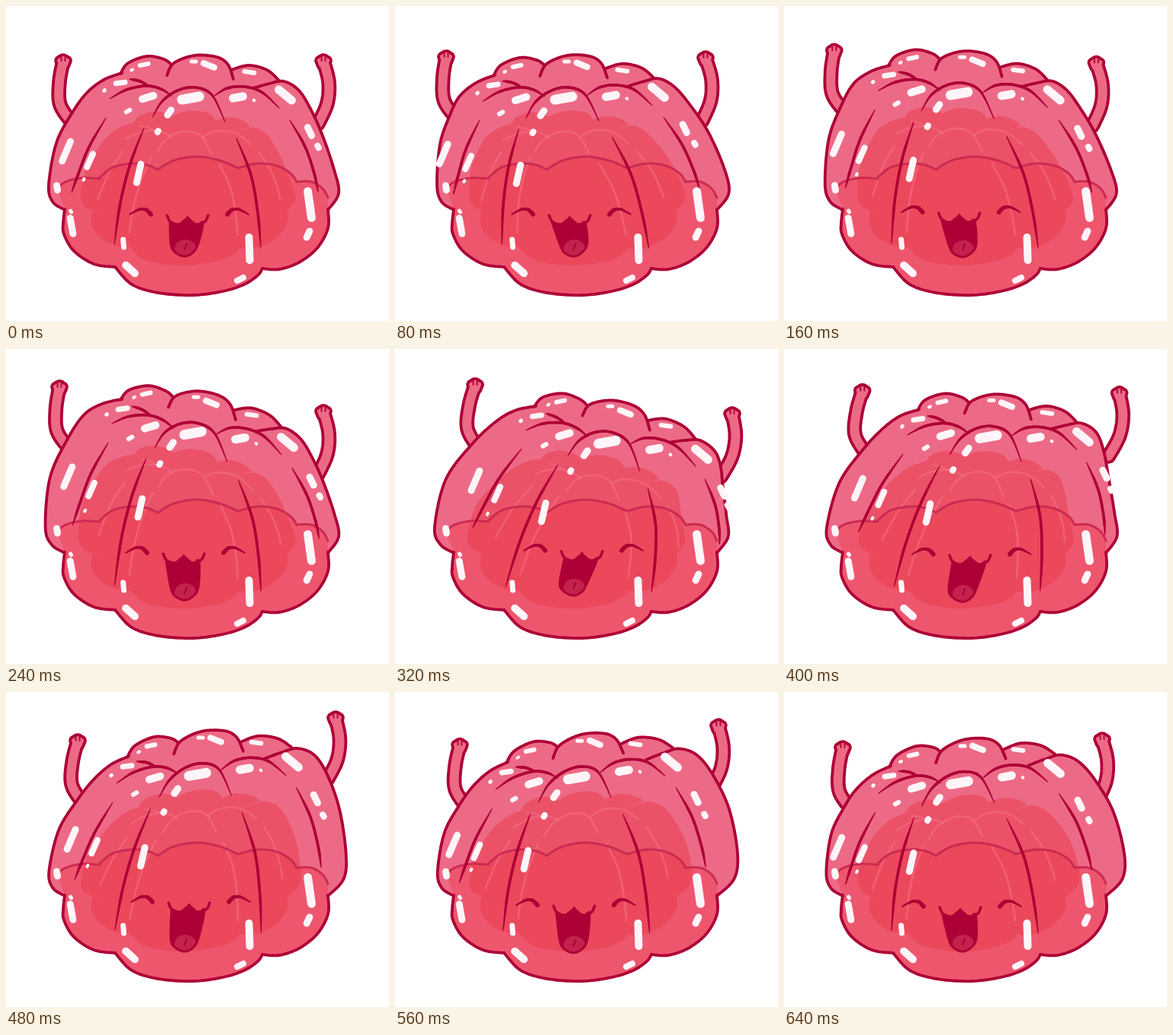
An HTML page with a canvas that plays this animation: 502x414 px, repeating every 720 ms.

```html
<!DOCTYPE html>
<html lang="en">
<head>
<meta charset="utf-8">
<title>Dancing jelly</title>
<style>
html, body { margin: 0; width: 100%; height: 100%; overflow: hidden; background: #fff; }
canvas { display: block; }
</style>
</head>
<body>
<canvas id="stage" width="502" height="414"></canvas>
<script>
const ctx = document.getElementById('stage').getContext('2d');
const LINE = '#ad0036', JELLY = '#ed6a86', SKIRT = '#ee566e', SHINE = '#fff5f8';
const MID = 245, STEP_MS = 80;

// Positions among the key poses, one per step; halves lie between two poses.
const STEPS = [0, 1, 1.5, 2, 3, 3.5, 4, 4.5, 5];

// Dome dx, dy, tilt; face dx, dy; chin drop; left hand dx, dy; right hand dx, dy.
const POSES = [
  [0, 0, 0, 0, 0, 0, 0, 0, 0, 0],
  [-21, 0, -.03, -9, 0, 0, -8, -5, -9, -4],
  [3, -10, .13, -5, -6, 1, -5, -22, 0, 10],
  [36, 2, .16, 7, -9, -5, 30, -25, 26, 13],
  [9, -13, -.1, 2, 2, 12, 19, -8, 16, -38],
  [-12, -2, -.12, -7, 8, 12, 2, 1, 1, -10]];

// The jelly at rest, as points on smooth curves.
const outline = [
  [75,267, 61,257, 56,235, 66,180, 87,140, 106,114, 128,97, 152,88],
  [150,89, 160,75, 185,66, 207,70, 217,77],
  [211,91, 220,75, 247,65, 276,67, 291,77, 298,96],
  [295,84, 318,78, 342,84, 357,97],
  [324,108, 345,102, 364,99, 383,110, 398,133, 414,168, 430,215, 436,246, 422,268]];
const ridges = [
  [162,96, 176,99, 188,106],
  [136,122, 158,110, 184,105, 203,109, 217,118],
  [192,146, 205,125, 225,111, 248,107, 270,117, 287,152],
  [273,118, 290,108, 312,106, 335,113, 358,134],
  [131,147, 109,185, 95,220, 86,245],
  [181,160, 163,207, 150,258, 142,313],
  [302,174, 321,222, 330,272, 334,318],
  [372,150, 392,185, 404,220, 409,244]];
const rim = [
  [67,240, 78,231, 100,226, 123,227],
  [123,225, 140,212, 165,207, 185,209, 199,215],
  [199,215, 220,203, 250,198, 280,203, 304,213],
  [304,213, 330,207, 355,210, 373,220, 381,231],
  [381,231, 400,231, 415,240, 422,252]];
const hem = [
  [422,267, 422,292, 408,318, 384,337, 358,346, 336,345],
  [336,345, 330,354, 312,366, 284,375, 245,380, 200,377, 165,366, 143,343],
  [143,343, 115,339, 89,322, 76,300, 75,285, 77,267]];
const arms = [
  [88,155, 71,130, 70,100, 75,72],
  [409,155, 421,128, 423,100, 416,72]];

// Shines: x, y, length, width, degrees.
const domeShines = [
  [181,77,17,6,-12], [165,84,6,4,-30], [266,78,23,8,22], [246,73,11,5,0], [319,87,19,6,8],
  [150,101,19,7,-8], [129,111,6,5,-40], [186,120,25,10,-17], [160,138,11,6,-30],
  [242,121,36,13,-10], [214,140,17,9,125], [199,165,10,8,120], [304,120,24,11,-10],
  [325,124,5,4,40], [366,117,33,11,40], [398,165,21,9,64], [409,185,11,8,60],
  [79,191,37,9,-67], [110,203,27,8,-66], [102,228,6,4,-60], [174,220,34,9,-77]];
const skirtShines = [
  [319,319,40,10,88], [154,312,17,7,85], [163,346,26,10,42], [398,261,46,11,82],
  [396,300,18,9,115], [67,239,15,9,80], [86,289,30,9,80], [85,270,7,5,60], [307,359,17,8,-27]];

const clamp = v => Math.max(0, Math.min(1, v));

function poseAt(pos) {
  const i = Math.floor(pos), n = POSES.length;
  if (i === pos) return POSES[i];
  const [a, b, c, d] = [i - 1, i, i + 1, i + 2].map(k => POSES[(k + n) % n]);
  return b.map((v, k) => (9 * (v + c[k]) - a[k] - d[k]) / 16);
}

// Apply f to each point of a flat list.
function mapPoints(p, f) {
  const out = [];
  for (let i = 0; i < p.length; i += 2) out.push(...f(p[i], p[i + 1], i / (p.length - 2)));
  return out;
}
const shift = (p, dx, dy) => mapPoints(p, (x, y) => [x + dx, y + dy]);

// The front sways most at the top; it is fixed at the bottom.
function bendFront(p, [dx, dy, tilt]) {
  return mapPoints(p, (x, y) => {
    const k = clamp((330 - y) / 190);
    return [x + k * dx, y + k * (dy + tilt * (x - MID))];
  });
}

// The outline is stiffer low down, and the side that rises swells outwards.
function bendEdge(p, [dx, dy, tilt]) {
  return mapPoints(p, (x, y) => {
    const k = clamp((267 - y) / 150) ** 2;
    const swell = Math.max(0, tilt * (MID - x) / 190) * (x < MID ? -80 : 220);
    return [x + k * dx + swell * Math.sin(Math.PI * clamp((267 - y) / 220)),
            y + k * (dy + tilt * (x - MID))];
  });
}

// Smooth curve through flat points, as a list of [x, y].
function curve(p) {
  const n = p.length / 2, out = [];
  const get = (i, c) => p[2 * Math.max(0, Math.min(n - 1, i)) + c];
  for (let i = 0; i < n - 1; i++) {
    for (let t = 0; t < .95; t += .1) {
      out.push([0, 1].map(c => {
        const [a, b, d, e] = [i - 1, i, i + 1, i + 2].map(k => get(k, c));
        return b + t * ((d - a) + t * ((2*a - 5*b + 4*d - e) + t * (3*b - a - 3*d + e))) / 2;
      }));
    }
  }
  out.push([get(n - 1, 0), get(n - 1, 1)]);
  return out;
}

function fill(color, ...shapes) {
  ctx.beginPath();
  for (const s of shapes) {
    s.forEach((q, i) => i ? ctx.lineTo(...q) : ctx.moveTo(...q));
    ctx.closePath();
  }
  ctx.fillStyle = color;
  ctx.fill();
}
function stroke(points, color, width) {
  ctx.beginPath();
  points.forEach(q => ctx.lineTo(...q));
  ctx.strokeStyle = color;
  ctx.lineWidth = width;
  ctx.stroke();
}
// Stroke whose width follows a function of 0..1 along the curve.
function brush(points, width) {
  const n = points.length - 1;
  for (let i = 0; i < n; i++) stroke([points[i], points[i + 1]], LINE, width((i + .5) / n));
}

function drawArm(p, dx, dy) {
  p = mapPoints(p, (x, y, t) => [x + dx * (.7 + .3 * t), y + dy]);
  const [x, y] = p.slice(-2), arm = curve(p);
  for (const [color, edge] of [[LINE, 3.8], [JELLY, 0]]) {
    stroke(arm, color, 12 + 2 * edge);
    for (const f of [-5, 0, 5]) {
      stroke([[x + f, y - 2 + Math.abs(f) / 3], [x + f / 2, y + 6]], color, 6 + 2 * edge);
    }
  }
  for (const f of [-2.5, 2.5]) stroke([[x + f, y - 5], [x + f, y]], LINE, 1.8);
}

function drawShine([x, y, length, width, degrees]) {
  const a = degrees * Math.PI / 180, r = (length - width) / 2;
  const dx = r * Math.cos(a), dy = r * Math.sin(a);
  stroke([[x - dx, y - dy], [x + dx, y + dy]], SHINE, width);
}

function drawFace(dx, dy, drop) {
  const x = 238 + dx, y = 277 + dy, cx = 234, cy = 329 + drop;
  const mouth = curve([x-23,y+8, x-13,y+11, x,y+3, x+12,y+11, x+20,y+8,
    cx+18,cy-17, cx+11,cy-5, cx,cy, cx-12,cy-5, cx-18,cy-16, x-23,y+8]);
  fill(LINE, mouth);
  ctx.save();
  ctx.clip();
  ctx.beginPath();
  ctx.ellipse(cx + 1, cy - 10, 14, 12, 0, 0, 7);
  ctx.fillStyle = '#c2234c';
  ctx.fill();
  stroke([[cx + 3, cy - 17], [cx, cy - 9]], LINE, 2);
  ctx.restore();
  stroke(mouth, LINE, 3);
  for (const s of [-1, 1]) {
    const lip = [0,1, 6,8, 14,10, 23,6, 27,-2], eye = [15,3, 8,-1, 1,-4, -7,-3, -13,3];
    const place = (p, px, py) => curve(mapPoints(p, (u, v) => [px + s * u, py + v]));
    stroke(place(lip, x, y), LINE, 3.5);
    brush(place(eye, x + 2 + s * 63, y - 6), t => 1.5 + 4 * t);
  }
}

function draw(pose) {
  const [, , , faceX, faceY, drop, lx, ly, rx, ry] = pose;
  ctx.fillStyle = '#fff';
  ctx.fillRect(0, 0, 502, 414);
  drawArm(arms[0], lx, ly);
  drawArm(arms[1], rx, ry);

  const dome = outline.map(p => curve(bendEdge(p, pose)));
  const folds = ridges.map(p => curve(bendFront(p, pose)));
  const rims = rim.map(curve), hems = hem.map(curve);
  const domeShape = dome.flat(), skirtShape = [...rims, ...hems].flat();
  fill(JELLY, domeShape);
  fill(SKIRT, skirtShape);

  // The core is a smaller copy of the whole jelly.
  ctx.save();
  ctx.translate(240, 341);
  ctx.scale(.74, .645);
  ctx.translate(-248, -380);
  fill('rgba(234,58,74,.5)', domeShape, skirtShape);
  folds.forEach(p => stroke(p, 'rgba(246,120,142,.45)', 3.6));
  ctx.restore();

  rims.forEach(p => stroke(p, '#cb2b52', 3));
  [...dome, ...hems].forEach(p => stroke(p, LINE, 3.8));
  folds.forEach(p => brush(p, t => 1 + 2.6 * clamp(4 * Math.min(t, 1 - t))));
  domeShines.forEach(([x, y, ...size]) => drawShine([...bendFront([x, y], pose), ...size]));
  skirtShines.forEach(drawShine);
  drawFace(faceX, faceY, drop);
}

ctx.lineCap = ctx.lineJoin = 'round';
function frame() {
  draw(poseAt(STEPS[Math.floor(performance.now() / STEP_MS) % STEPS.length]));
  requestAnimationFrame(frame);
}
frame();
</script>
</body>
</html>
```
